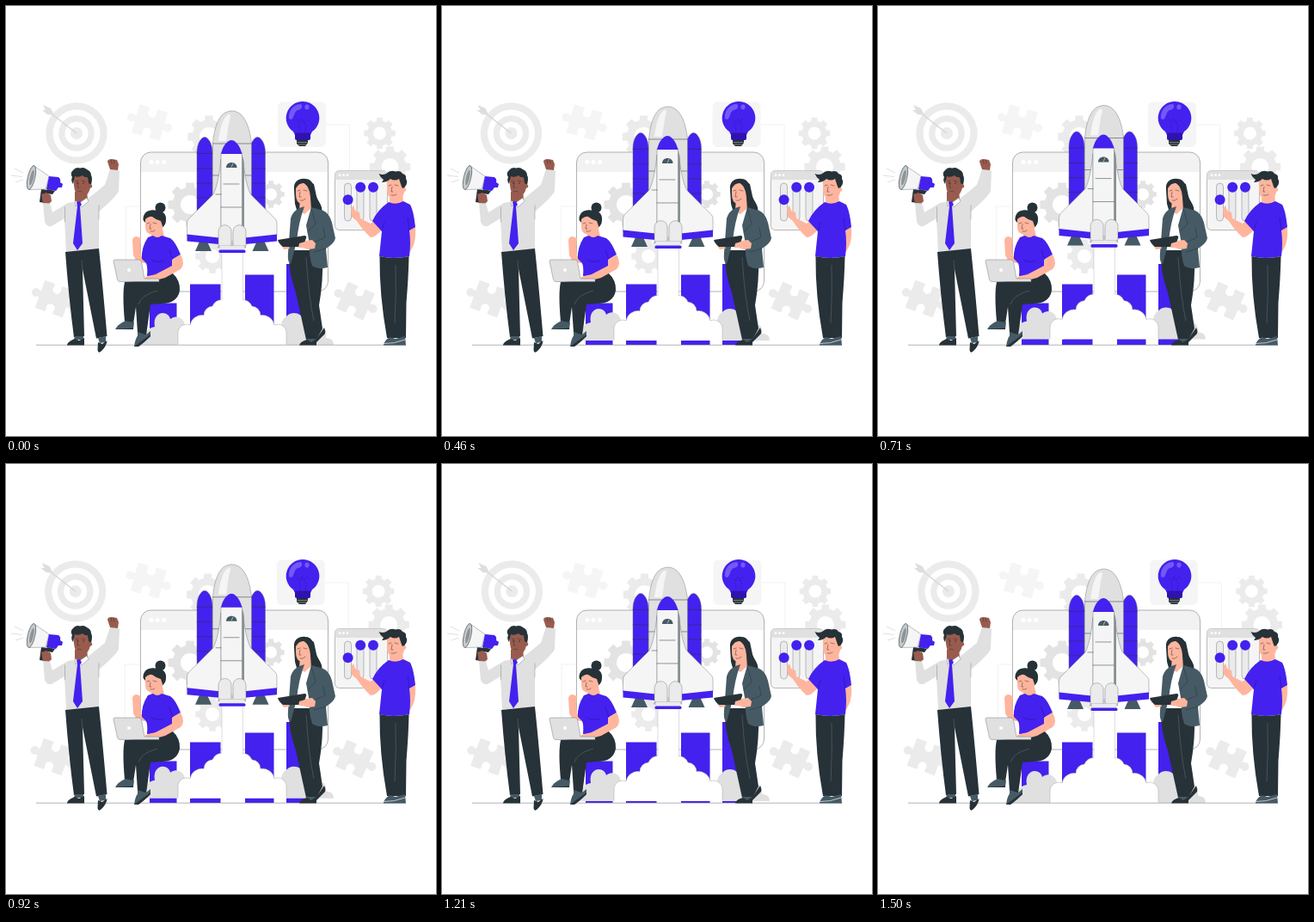
Animation, 500 px wide and 500 px high, one loop 1540 ms. Source, as an HTML page:

```html
<!DOCTYPE html>
<html lang="en">
<head>
<meta charset="utf-8">
<title>Launch</title>
<style>
html, body { margin: 0; height: 100%; overflow: hidden; background: #fff; }
svg { display: block; width: 100vw; height: 100vh; }
.p { fill: #4421ee; }
.d { fill: #263238; }
.j { fill: #455a64; }
.g { fill: #e0e0e0; }
.l { fill: #ebebeb; }
.f { fill: #f5f5f5; }
.w { fill: #fff; }
.s { fill: #ffb59d; }
.b { fill: #995b4d; }
.o { stroke: #697276; stroke-width: .45; }
.n { fill: none; stroke: #263238; stroke-width: .5; stroke-linecap: round; }
.c { fill: none; stroke: #66737a; stroke-width: .5; }
.h { fill: none; stroke: #ededed; stroke-width: .7; }
</style>
</head>
<body>
<svg viewBox="0 0 500 500">
  <defs>
    <path id="piece" d="M-17-17H-6C-3-17-5-13-5-11A5 4.500 0 0 0 5-11C5-13 3-17 6-17H17V-5C17-2 20-5 22-5A5 5 0 0 1 22 5C20 5 17 2 17 5V17H6C3 17 5 13 5 11A5 4.500 0 0 0-5 11C-5 13-3 17-6 17H-17V5C-17 2-20 5-22 5A5 5 0 0 1-22-5C-20-5-17-2-17-5Z"/>
    <g id="booster">
      <path class="p o" d="M222 241V170C222 160 227 152.500 231 152.500S240 160 240 170V241Z"/>
      <path class="n" d="M222 171.500h18M222 189h18M222 206h18M222 223h18"/>
    </g>
    <g id="wing">
      <path class="j" d="M225 274h9l5 11h-19z"/>
      <path class="f o" d="M250 178C248 198 245 211 241 219L212 248Q210.500 250 210.500 253V267L250 271Z"/>
      <path class="p" d="M210.500 265.500L248 269.500V277L210.500 273.500Z"/>
    </g>
    <path id="puffs" d="M200 394V380A10 10 0 0 1 214 371A14 14 0 0 1 230 359.500A10.500 10.500 0 0 1 240 349A12 12 0 0 1 252 341.500H264V394Z"/>
    <path id="puffLine" d="M200 393V380A10 10 0 0 1 214 371A14 14 0 0 1 230 359.500A10.500 10.500 0 0 1 240 349A12 12 0 0 1 251 341.500" fill="none" stroke="#9c9c9c" stroke-width=".45"/>
  </defs>

  <!-- drifting backdrop -->
  <g class="drift">
    <g class="l">
      <circle cx="82" cy="148" r="35.700"/>
      <circle class="w" cx="82" cy="148" r="27.500"/>
      <circle cx="82" cy="148" r="20.800"/>
      <circle class="w" cx="82" cy="148" r="13.500"/>
      <circle cx="82" cy="148" r="7"/>
    </g>
    <path d="M50 123L82 148" stroke="#d6d6d6" stroke-width="1.300"/>
    <path fill="#dedede" d="M43 115L52 119L56 127L48 126L42 121L46 121Z"/>
    <use href="#piece" class="f" transform="translate(167 135.500) rotate(16)"/>
    <use href="#piece" class="l" transform="translate(55.500 340.500) rotate(20)"/>
    <use href="#piece" class="l" transform="translate(406.500 343) rotate(24)"/>
    <path class="l" data-gear="434.5 148 18.5 7.500"/>
    <path class="l" data-gear="446.5 187 24 10"/>
    <path class="l" data-gear="236 152 25 11"/>
    <path class="h" d="M372 138H399.500V193M156 233H139.500V296"/>
    <rect class="f" x="316" y="111.500" width="56" height="52.500" rx="6"/>
  </g>

  <!-- browser window -->
  <rect x="156.500" y="170" width="218" height="162" rx="12" fill="#fff"/>
  <path fill="#f2f2f2" d="M156.500 193V182A12 12 0 0 1 168.500 170H362.500A12 12 0 0 1 374.500 182V193Z"/>
  <rect x="156.500" y="170" width="218" height="162" rx="12" fill="none" stroke="#808080" stroke-width=".6"/>
  <g class="w"><circle cx="169" cy="181.500" r="2.500"/><circle cx="176" cy="181.500" r="2.500"/><circle cx="183.500" cy="181.500" r="2.500"/></g>
  <path fill="#e3e3e3" data-gear="214 231 26 11"/>
  <path fill="#e3e3e3" data-gear="308 219 16 7"/>
  <path class="l" data-gear="240 291 20 8"/>

  <!-- bulb -->
  <path class="p" d="M345 111A19.200 19.200 0 0 1 356 146L354 150H336L334 146A19.200 19.200 0 0 1 345 111Z"/>
  <path fill="#7459f6" d="M329 131C328 121 335 114 343 114C346 117 343 121 339 121C335 123 335 130 332 132Z"/>
  <ellipse cx="350" cy="117.500" rx="2.600" ry="3" fill="#7459f6"/>
  <path d="M338 132L342 136L344 131L347 137L349 131L352 134M341 138L342 146M349 138L348 146" fill="none" stroke="#2a13a8" stroke-width=".5" stroke-dasharray="2 1"/>
  <rect x="336" y="147.500" width="18" height="8.500" rx="2" fill="#2f13ae"/>
  <path class="d" d="M338 156H351V159L348 163H341L338 160Z"/>
  <path d="M338.500 158.500h12M340 161h9" stroke="#a8adb0" stroke-width=".6"/>

  <!-- chart bars -->
  <g class="p">
    <rect x="167" y="345.500" width="31.500" height="48.500"/>
    <rect x="214" y="323.500" width="35.500" height="70.500"/>
    <rect x="278" y="312.500" width="33.500" height="81.500"/>
    <rect x="326" y="300" width="30" height="94"/>
  </g>

  <!-- shuttle and smoke -->
  <g id="rocket">
    <path class="g" d="M151 394C152 386 158 386 162 386C162 377 167 374 173 373C171 362 177 357 182 357C187 357 190 360 191 364C198 358 208 363 208 372L216 378V394Z"/>
    <path class="g" d="M381 394C381 388 377 386 372 386C373 378 369 374 362 374C361 366 354 362 347 366C343 355 331 355 326 361C321 364 319 370 321 375L312 380V394Z"/>
    <path class="w" d="M251 286H275.500V346H251Z"/>
    <path d="M251 287V342M275.500 287V342" stroke="#b9b9b9" stroke-width=".5"/>
    <use href="#puffs" class="w"/>
    <use href="#puffs" class="w" transform="matrix(-1 0 0 1 526 0)"/>
    <use href="#puffLine"/>
    <use href="#puffLine" transform="matrix(-1 0 0 1 526 0)"/>

    <use href="#booster"/>
    <use href="#booster" x="61.500"/>
    <path class="g o" d="M240.500 250V160C242 142 247 128 255 124Q263 120 270 124C279 129 284 144 285.500 160V250Z"/>
    <path class="f" d="M247 157C249 140 253 128 259 126C262 125 261 130 259 136L256 157Z"/>
    <path class="n" d="M240.500 160H285.500M240.500 197h10M276 197h9"/>
    <use href="#wing"/>
    <use href="#wing" transform="matrix(-1 0 0 1 525.500 0)"/>
    <path fill="#8a9093" d="M274 172Q277 178 277 188V258H274Z"/>
    <path class="f o" d="M250 274V171Q262 166 274.500 171V274Z"/>
    <path class="p" d="M250 172C252 162 258 156 262.200 156S272 162 274.500 172Z"/>
    <path class="j" d="M256 188C256 184 259 182 262.200 182S268.500 184 268.500 188Z"/>
    <path d="M262 187.500L264 183" stroke="#ddd" stroke-width=".7"/>
    <path class="n" d="M253 207H271M250 234H274M244 219H250"/>
    <path class="g o" d="M250 276H276L279 281H246Z"/>
    <path class="l o" d="M247 279V263C247 252 262 252 262 263V279ZM264 279V263C264 252 279 252 279 263V279Z"/>
    <rect class="l" x="249" y="279" width="28" height="5"/>
    <rect class="p" x="247.500" y="283.500" width="31" height="3.600" rx="1.500"/>
  </g>

  <!-- slider panel -->
  <rect class="f" x="382.500" y="191.500" width="61" height="69" rx="5" stroke="#8c8c8c" stroke-width=".6"/>
  <path class="g" d="M382.500 202V196.500A5 5 0 0 1 387.500 191.500H438.500A5 5 0 0 1 443.500 196.500V202Z"/>
  <g class="w"><circle cx="388" cy="196.700" r="1.400"/><circle cx="392.500" cy="196.700" r="1.400"/><circle cx="397" cy="196.700" r="1.400"/></g>
  <g class="l o">
    <rect x="393.500" y="206" width="8" height="44" rx="4"/>
    <rect x="408" y="206" width="8" height="44" rx="4"/>
    <rect x="423" y="206" width="8" height="44" rx="4"/>
  </g>
  <g class="p"><circle cx="397.600" cy="225.300" r="6"/><circle cx="412.200" cy="210.800" r="6"/><circle cx="427" cy="210.800" r="6"/></g>

  <path d="M35 394.200H465" stroke="#7b8386" stroke-width=".6"/>

  <!-- man with megaphone -->
  <path d="M6 197L19 198.500M10 189L20 194M11 205L20 202" stroke="#c9c9c9" stroke-width=".6"/>
  <path class="d" d="M41 213L49 214L45 229L39 228Z"/>
  <path class="f o" d="M32 185.500L50 198L46 213L27 213.500Z"/>
  <ellipse fill="#c9c9c9" stroke="#455a64" stroke-width=".7" cx="29.500" cy="199.500" rx="4.200" ry="14.300" transform="rotate(13 29.500 199.500)"/>
  <ellipse fill="#8d9498" cx="30" cy="199.500" rx="2" ry="9" transform="rotate(13 30 199.500)"/>
  <path class="p" d="M50 198L61 199Q64 201 63 205L66 207L65 211L61 211L58 215L47 213Z"/>
  <path class="d" d="M48 213L57 215L54 219L47 218Z"/>
  <path class="b" d="M41 219L47 217L52 220L53 227L49 231L43 230Z"/>
  <path class="g" d="M43 229L51 229.500L54 240L72 229L94 225L115 208L121 189.500L132 191.500L131 215Q129 221 108 239V283L70 286L68 247L53 256Q47 257 45 251Z"/>
  <path class="n" stroke-opacity=".5" d="M68.500 234V251M108 232V248"/>
  <path class="b" d="M118 181Q118 178 123 178L129 179L131 184L130 191L121 190Z"/>
  <path class="n" d="M122 179l1 4M125 179l1 4"/>
  <path class="b" d="M80 216L94 213L95 226L85 231L80 227Z"/>
  <path class="b" d="M79 198C82 193 96 193 98 200C100 211 96 222 88 222C80 222 78 210 79 198Z"/>
  <path class="d" d="M78 207Q75 203 77 199Q74 194 78 191Q81 187 86 188.500Q91 187 94 190Q99 192 99 197Q101 200 99 208L96 206L95 199Q92 200 89 197Q84 200 80 198Z"/>
  <circle class="b" cx="98" cy="209.500" r="2.200"/>
  <path class="n" d="M81 204l3 -1M88 203l4 1M84 205l-1 6h2M83 216q3 -2 5 0"/>
  <g class="d"><circle cx="83" cy="206" r=".8"/><circle cx="90" cy="206" r=".8"/></g>
  <path class="w o" d="M80 226L85 229L94 223L96 227L88 234L85 230L81 233Z"/>
  <path class="p" d="M82 228L86 227L88 231L86 233L89 276L83 284L78 276L83 233Z"/>
  <path class="d" d="M69 286L108 282Q112 320 117.500 384L105 386.500L89 306L91 384L79 385Q73 340 69 286Z"/>
  <path class="c" d="M88 296L89 308"/>
  <path class="j" d="M80 384H90V388H79ZM107 386L116 384L116 391L109 392Z"/>
  <path class="d" d="M71 394Q72 390 80 387L85 389L91 386V394.500H71ZM107 391L112 393L117.500 389Q117 396 110 402Q107 404 106.500 400Z"/>

  <!-- seated woman -->
  <g class="d">
    <circle cx="179.500" cy="234.500" r="6"/>
    <path d="M159.500 249C159 240 166 236.500 173 237.500C182 237 187 242 186 249C186 255 182 258 178 259L162 252Z"/>
  </g>
  <path class="s" d="M171 259L181 255L184 268L176 273L168 269Z"/>
  <path class="s" d="M162 248Q167 244 170 245Q175 249 180 250L182 256Q178 266 170 266Q162 265 162 257Z"/>
  <path class="n" d="M164 253l3 -1M171 252l4 1M168 254l-1 5h2M168 262q3 1 5 -1"/>
  <path class="s" d="M147 272Q148 268 152 268L157 270L156 279L157 291L164 284L166 300L152 297L148 290Z"/>
  <path class="p" d="M165 269L171 267Q176 271 181 267L191 270Q197 274 203 289L193 295L194 312L164 314Q165 304 163 299L158 294Q157 281 165 269Z"/>
  <path d="M190 283l4 12M169 295q6 4 14 1" stroke="#2d12b5" stroke-width=".7" fill="none"/>
  <path class="d" d="M138 321L164 319L193 310Q203 319 202 331Q199 346 181 346L168 347L163 383L153 380L151 350L148 370L138 367Q135 334 138 321Z"/>
  <path class="c" d="M154 347Q157 336 176 331"/>
  <path class="j" d="M139 366L148 368L147 371L138 370ZM153 379L162 382L161 387L153 385Z"/>
  <path class="j" d="M127 376Q130 370 139 366L142 370L149 368L148 376ZM149 396Q150 387 154 382L158 386L168 378L168 384Q161 391 154 396Z"/>
  <path class="d" d="M127 376L148 374.500V376ZM149 396L168 382V384Q161 391 154 396Z"/>
  <path class="s" d="M193 295L203 289Q209 300 203 306L185 316L174 319L161 319L162 315L174 312L193 302Z"/>
  <path class="g o" d="M127 295H154Q157 295 157.500 297L161 317H178V320.500H132Q130 320 129.500 318L125 297Q125 295 127 295Z"/>
  <circle class="w" cx="143" cy="307" r="2"/>

  <!-- woman with tablet -->
  <path class="d" d="M335 213C334 204 341 200 348 201C356 201 358 208 359 216C361 226 369 231 367 241L340 244L336 230Z"/>
  <path class="s" d="M342 223L354 219L356 237L348 244L341 238Z"/>
  <path class="s" d="M337 212Q341 205 347 206Q351 209 354 214L355 221Q352 230 344 230Q337 229 337 219Z"/>
  <path class="n" d="M339 215l3 -1M346 214l4 1M342 216l-1 6h2M342 226q4 1 6 -2"/>
  <path class="d" d="M345 205Q353 209 354 222L355 238L367 241Q369 234 362 226L358 207L349 202Z"/>
  <path class="d" d="M329 283L356 280L368 292Q369 320 364 348L368 375L361 388H349L337 333Q328 310 329 283Z"/>
  <path class="c" d="M349 292Q352 340 358 366"/>
  <path class="w" d="M340 237L347 242L355 235L354 284L333 284Z"/>
  <path class="j" d="M341 235L347 233Q340 252 338 274L331 300Q327 298 328 287L331 247Q333 239 341 235Z"/>
  <path class="j" d="M355 234L369 238Q376 241 379 252L383 270Q382 276 372 282L374 304Q363 307 356 302Q352 291 353 277L349 255Z"/>
  <path class="n" d="M355 235L360 253L351 263M372 282L358 286M369 258L371 269L360 274"/>
  <path class="s" d="M347 273L356 272L360 276L359 282L351 283L345 281ZM319 277L328 278L330 282L323 283Z"/>
  <path class="d" d="M316 272L347 267Q350 267 349 270L345 280L322 280Q317 276 316 272Z"/>
  <path class="s" d="M341 276L351 273L354 276L349 281L340 281Z"/>
  <path class="j" d="M349 387H361V391H349Z"/>
  <path class="d" d="M341 394.500Q342 390 350 388L355 391L361 387L370 374Q372 378 371 381L361 391V394.500Z"/>

  <!-- man at the panel -->
  <path class="s" d="M429 249L438 259Q430 269 424 269Q415 261 408 250L402 245L401 236L404 232L406 238L411 240L412 247L424 253Z"/>
  <path class="s" d="M470 258L476 257Q477 272 473 280L467 291L465 281Z"/>
  <path class="s" d="M446 221L461 216L462 229L453 235L446 231Z"/>
  <path class="s" d="M443 203Q450 198 462 203L464 212Q462 226 453 226Q444 225 443 215Z"/>
  <path class="d" d="M437 205L439 202Q435 199 433.500 195Q438 197 442 195Q447 190 453 192.500Q459 191 461 195Q466 196 465 201Q468 205 464 210L462 214L460 210L457 201Q452 204 447 201Q443 205 437 205Z"/>
  <circle class="s" cx="463" cy="213.500" r="2.300"/>
  <path class="n" d="M445 209l3 -1M452 208l4 1M449 210l-1 6h2M448 220q4 1 6 -1"/>
  <path class="p" d="M445 228Q453 232 462 227L470 231Q474 238 476 257L469 261Q471 275 469 291Q451 295 434 291L437 262L426 250Q432 237 445 228Z"/>
  <path d="M437 262l3 -11M469 261l-2 -15" stroke="#2d12b5" stroke-width=".7"/>
  <path class="d" d="M434.500 291Q452 295 468.500 291Q468 315 465.500 345L465 386L443 386Q434 336 434.500 291Z"/>
  <path class="c" d="M453 301Q454 335 452 369"/>
  <path class="j" d="M439 394Q440 389 446 385L453 387L464 384L465 394.500H439Z"/>
  <path d="M439 392.500Q451 393 464 388" fill="none" stroke="#cfd4d6" stroke-width=".9"/>
</svg>
<script>
const LOOP = 1540;
const PEAK = 670;
const LIFT = 6.5;
const DRIFT = [[0, 0], [230, 1.1], [460, -1.5], [690, -2.1], [1080, -0.8], [1330, -0.4], [LOOP, 0]];
const rocket = document.getElementById('rocket');
const backdrop = document.querySelector('.drift');

function gearPath(cx, cy, r, hole, teeth = 8) {
  const step = Math.PI * 2 / teeth;
  const pts = [];
  for (let i = 0; i < teeth; i++) {
    for (const [a, k] of [[-0.31, 0.79], [-0.23, 1], [0.23, 1], [0.31, 0.79]]) {
      const t = (i + a) * step;
      pts.push((cx + Math.cos(t) * r * k).toFixed(2) + ' ' + (cy + Math.sin(t) * r * k).toFixed(2));
    }
  }
  return `M${pts.join('L')}ZM${cx - hole} ${cy}a${hole} ${hole} 0 1 0 ${hole * 2} 0a${hole} ${hole} 0 1 0 ${-hole * 2} 0Z`;
}

for (const el of document.querySelectorAll('[data-gear]')) {
  el.setAttribute('d', gearPath(...el.dataset.gear.split(' ').map(Number)));
  el.setAttribute('fill-rule', 'evenodd');
}

function along(keys, t) {
  const i = Math.max(1, keys.findIndex(k => k[0] >= t));
  const [t0, a] = keys[i - 1];
  const [t1, b] = keys[i];
  return a + (b - a) * (t - t0) / (t1 - t0);
}

const ease = x => (1 - Math.cos(x * Math.PI)) / 2;

function draw(now) {
  const t = now % LOOP;
  const rise = LIFT * ease(t < PEAK ? t / PEAK : (LOOP - t) / (LOOP - PEAK));
  rocket.setAttribute('transform', `translate(0 ${-rise})`);
  backdrop.setAttribute('transform', `translate(${along(DRIFT, t)} 0)`);
}

const start = performance.now();
function tick() {
  draw(performance.now() - start);
  requestAnimationFrame(tick);
}
tick();
</script>
</body>
</html>
```
